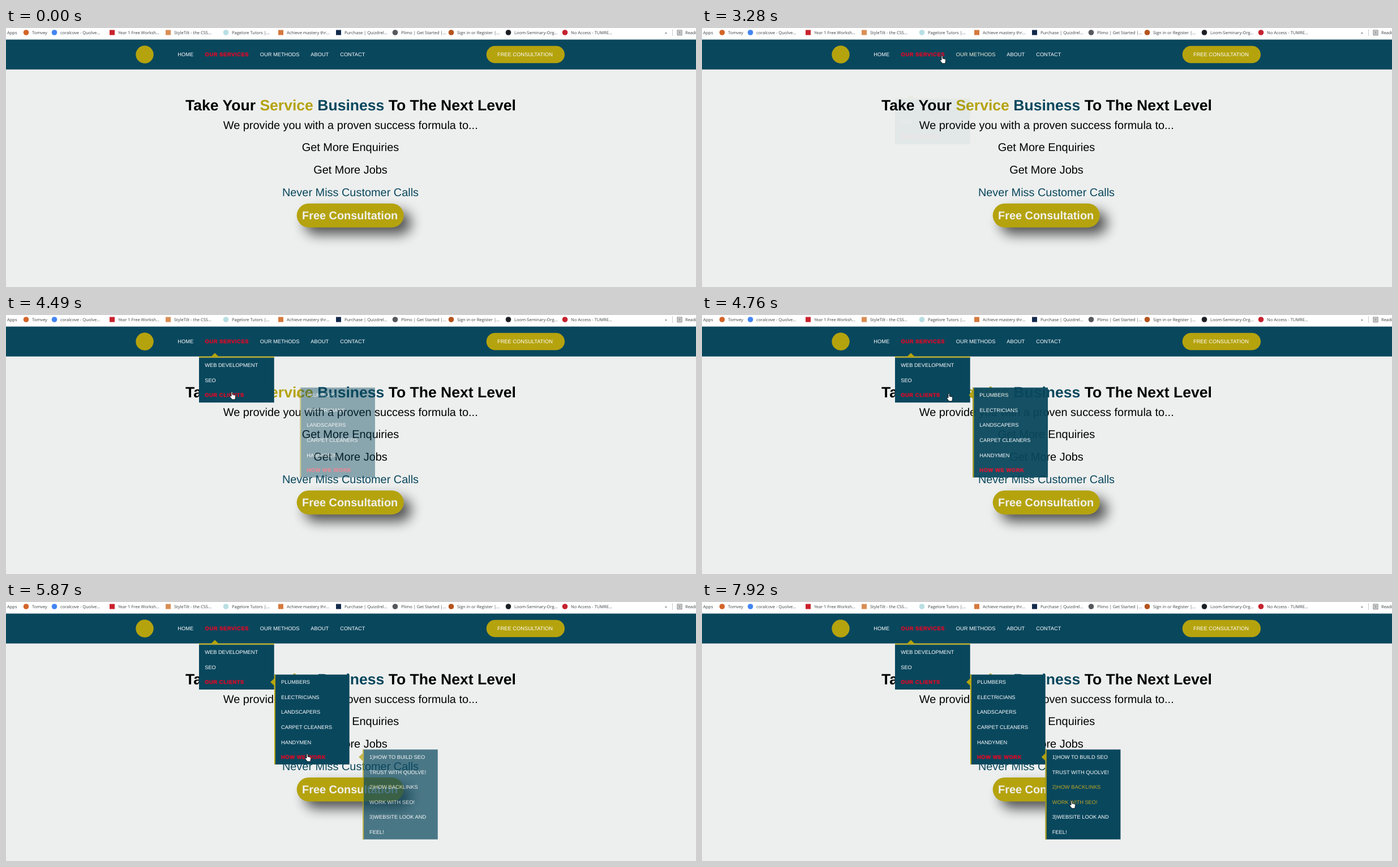
These frames come from a looping animation (1219x459 px, 8000 ms). An HTML page:

```html
<!DOCTYPE html>
<html lang="en">
<head>
<meta charset="utf-8">
<title>Dropdown menu</title>
<style>
  html, body { margin: 0; width: 100%; height: 100%; overflow: hidden; }
  svg { display: block; width: 1219px; height: 459px; }
  text { font: 9.296px "Liberation Sans", Arial, sans-serif; fill: #fff; text-rendering: geometricPrecision; }
  .mark { font: 7.5px "Open Sans", "Noto Sans", sans-serif; fill: #3c4043; }
  .line { font-size: 19.92px; fill: #000; text-anchor: middle; }
  .title { font-size: 26.56px; font-weight: 700; }
  .call { font-size: 19.92px; font-weight: 700; fill: #f1f1f0; }
  .active { font-weight: 700; letter-spacing: .62px; fill: #d90b29; stroke: #d90b29; stroke-width: .45px; }
  .gold { fill: #b5a30e; }
  .blue { fill: #09475d; }
  .cursor { fill: #fff; stroke: #000; stroke-width: .8px; stroke-linejoin: round; }
</style>
</head>
<body>
<svg id="stage" viewBox="0 0 1219 459">
  <defs>
    <filter id="blur" x="-30%" y="-120%" width="160%" height="340%"><feGaussianBlur stdDeviation="11"/></filter>
  </defs>
  <rect width="1219" height="459" fill="#edefee"/>
  <rect width="1219" height="21" fill="#fff"/>
  <g id="marks"></g>
  <path d="M1177.5 2V14" stroke="#c8c8c8"/>
  <path d="M1186 4H1194V12.5H1186ZM1187.5 6.5H1192.5M1187.5 8.3H1192.5M1187.5 10.2H1192.5" fill="none" stroke="#55585c" stroke-width=".9"/>

  <rect class="blue" y="20.5" width="1219" height="53"/>
  <circle class="gold" cx="245" cy="47" r="15.7"/>
  <rect class="gold" x="848.7" y="31.7" width="138.3" height="30.6" rx="15.3"/>
  <text x="868" y="50.4">FREE CONSULTATION</text>
  <g id="nav"></g>

  <text class="line title" x="609" y="146"
    >Take Your <tspan class="gold">Service</tspan> <tspan class="blue">Business</tspan> To The Next Level</text>
  <text class="line" x="608.7" y="178.5">We provide you with a proven success formula to...</text>
  <text class="line" x="608.5" y="218.3">Get More Enquiries</text>
  <text class="line" x="608.5" y="258.2">Get More Jobs</text>
  <text class="line blue" x="608.5" y="298">Never Miss Customer Calls</text>
  <rect x="527" y="324" width="189" height="42" rx="21" opacity=".65" filter="url(#blur)"/>
  <rect class="gold" x="513.7" y="311" width="189" height="42.4" rx="21.2"/>
  <text class="call" x="523" y="339">Free Consultation</text>

  <g id="menus"></g>
  <path id="arrow" class="cursor" d="M0 0V10.8L2.5 8.6L4.2 12.4L5.9 11.7L4.2 8H7.5Z"/>
  <path id="hand" class="cursor" d="M3 9V1.6Q4 0 5.1 1.6V6L9.4 7Q11 7.4 10.7 9.2L9.7 14.8H4.6L.6 9.8Q.2 8 2 8.3Z"/>
</svg>
<script>
const LOOP = 8000, FADE = 600;
const $ = id => document.getElementById(id);
const clamp = v => Math.max(0, Math.min(1, v));

function add(parent, tag, attrs, label = '') {
  const el = document.createElementNS('http://www.w3.org/2000/svg', tag);
  for (const name in attrs) el.setAttribute(name, attrs[name]);
  el.textContent = label;
  parent.append(el);
  return el;
}

// Bookmarks: text x, label, icon colour, square icon
[
  [2, 'Apps'],
  [46, 'Tomvey', '#d4652a'],
  [96, 'coralcove - Quolve...', '#4285f4'],
  [198, 'Year 1 Free Worksh...', '#c9222c', true],
  [297, 'StyleTilt - the CSS...', '#d98e55', true],
  [399, 'Pagelore Tutors |...', '#b9dfe3'],
  [496, 'Achieve mastery thr...', '#d5793f', true],
  [598, 'Purchase | Quizdrel...', '#12294a', true],
  [698, 'Plimo | Get Started |...', '#55585c'],
  [797, 'Sign in or Register |...', '#b4531d'],
  [898, 'Loom-Seminary-Org...', '#1b1f23'],
  [998, 'No Access - TUMRE...', '#c4232f'],
  [1164, '»'],
  [1200, 'Reading list']
].forEach(([x, label, fill, square]) => {
  if (square) add($('marks'), 'rect', { x: x - 15, y: 3.5, width: 9, height: 9, fill });
  else if (fill) add($('marks'), 'circle', { cx: x - 10.5, cy: 8, r: 4.8, fill });
  add($('marks'), 'text', { x, y: 10.7, class: 'mark' }, label);
});

// Links turn gold while hovered, from `enter` to `leave`
const links = [];
function link(parent, x, y, label, enter, leave) {
  const active = enter === 'active';
  const el = add(parent, 'text', { x, y, class: active ? 'active' : '' }, label);
  if (enter && !active) links.push({ el, enter, leave });
}

link($('nav'), 303.3, 50.4, 'HOME');
link($('nav'), 351.6, 50.4, 'OUR SERVICES', 'active');
link($('nav'), 448.8, 50.4, 'OUR METHODS', 3120, 3240);
link($('nav'), 538.3, 50.4, 'ABOUT');
link($('nav'), 590.2, 50.4, 'CONTACT');

function menu(x, y, start, dx, dy, items) {
  const g = add($('menus'), 'g');
  const height = items.length * 26.55;
  add(g, 'rect', { x, y, width: 132.7, height, class: 'blue' });
  if (dx) {
    add(g, 'rect', { x, y, width: 2, height, class: 'gold' });
    add(g, 'path', { d: `M${x} ${y + 6.6}l-7 6.7l7 6.7Z`, class: 'gold' });
  } else {
    add(g, 'rect', { x, y: y - 2, width: 132.7, height: 2, class: 'gold' });
    add(g, 'path', { d: `M${x + 21} ${y - 1.5}l7 -6.7l7 6.7Z`, class: 'gold' });
  }
  items.forEach(([label, enter, leave], i) =>
    link(g, x + (dx ? 12 : 10.2), y + 16.7 + i * 26.55, label, enter, leave));
  return { g, start, dx, dy };
}

const menus = [
  menu(341, 75.5, 3245, 0, 53, [
    ['WEB DEVELOPMENT', 3900, 4110], ['SEO', 4110, 4240], ['OUR CLIENTS', 'active']
  ]),
  menu(474, 128.6, 4334, 80, 0, [
    ['PLUMBERS', 4960, 5060], ['ELECTRICIANS', 5060, 5180], ['LANDSCAPERS', 5180, 5310],
    ['CARPET CLEANERS', 5360, 5480], ['HANDYMEN', 5480, 5620], ['HOW WE WORK', 'active']
  ]),
  menu(606.7, 261.4, 5620, 80, 0, [
    ['1)HOW TO BUILD SEO', 6960, 7440], ['TRUST WITH QUOLVE!', 6960, 7440],
    ['2)HOW BACKLINKS', 7440, LOOP], ['WORK WITH SEO!', 7440, LOOP],
    ['3)WEBSITE LOOK AND'], ['FEEL!']
  ])
];

// Cursor stops: time, x, y
const path = [
  [450, 1058, 452], [810, 833, 320], [2209, 833, 320], [2210, 795, 311],
  [2740, 613, 88], [2940, 611, 86], [3060, 540, 60], [3180, 470, 50],
  [3280, 420, 48], [3500, 412, 49], [3780, 412, 49], [4100, 397, 100],
  [4340, 395, 135], [4620, 395, 135], [4900, 468, 140], [5060, 502, 155],
  [5240, 517, 200], [5380, 525, 230], [5640, 528, 262], [5760, 528, 268],
  [6490, 528, 268], [6550, 544, 267], [6850, 600, 263], [7000, 628, 282],
  [7330, 640, 308], [7400, 640, 309], [7920, 649, 351]
];

function cursorAt(t) {
  const i = path.findIndex(p => p[0] > t);
  if (i < 0) return path[path.length - 1].slice(1);
  const [a, b] = [path[i - 1], path[i]];
  const k = (t - a[0]) / (b[0] - a[0]);
  return [a[1] + (b[1] - a[1]) * k, a[2] + (b[2] - a[2]) * k];
}

// cubic-bezier(.25, .1, .25, 1)
function ease(x) {
  x = clamp(x);
  let lo = 0, hi = 1;
  for (let i = 0; i < 20; i++) {
    const s = (lo + hi) / 2, r = 1 - s;
    if (.75 * s * r + s ** 3 < x) lo = s; else hi = s;
  }
  const r = 1 - lo;
  return .3 * lo * r * r + 3 * lo * lo * r + lo ** 3;
}

function hover(t, enter, leave) {
  const rise = ease((Math.min(t, leave) - enter) / FADE);
  return t > leave ? rise * (1 - ease((t - leave) / (FADE * rise))) : rise;
}

function draw(t) {
  for (const { g, start, dx, dy } of menus) {
    const p = ease((t - start) / FADE);
    g.setAttribute('opacity', p);
    g.setAttribute('transform', `translate(${dx * (1 - p)} ${dy * (1 - p)})`);
  }
  for (const { el, enter, leave } of links) {
    const p = hover(t, enter, leave);
    el.style.fill = `rgb(${255 - 65 * p}, ${255 - 91 * p}, ${255 - 225 * p})`;
  }
  const shown = t >= 450, onLink = t > 3110;
  $('arrow').style.display = shown && !onLink ? '' : 'none';
  $('hand').style.display = onLink ? '' : 'none';
  if (shown) {
    const move = `translate(${cursorAt(t).map(Math.round)})`;
    $('arrow').setAttribute('transform', move);
    $('hand').setAttribute('transform', move);
  }
}

function tick() {
  draw(performance.now() % LOOP);
  requestAnimationFrame(tick);
}
tick();
</script>
</body>
</html>
```
